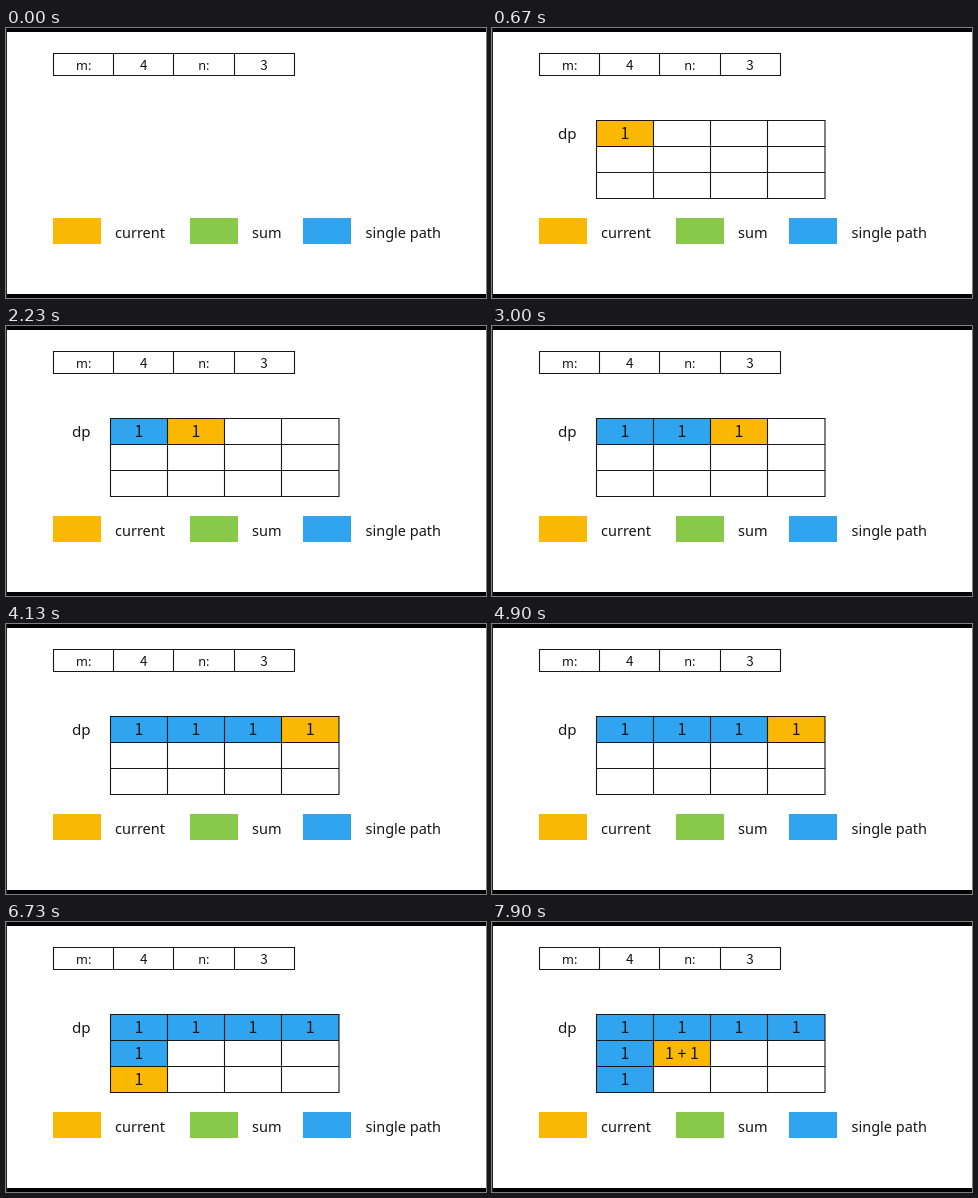
An HTML page for the animation above (8 s loop, 480x270 px).

```html
<!DOCTYPE html>
<html lang="en">
<head>
<meta charset="utf-8">
<title>Unique paths</title>
<style>
html, body { margin: 0; width: 100%; height: 100%; overflow: hidden; background: #fff; }
svg { display: block; width: 100vw; height: 100vh; }
text { font-family: "Noto Sans", "Open Sans", sans-serif; fill: #161616; }
.digit { font-family: "Noto Sans CJK SC", "Noto Sans CJK JP", "Noto Sans", sans-serif; }
.line { fill: none; stroke: #181818; stroke-width: 1.1; }
</style>
</head>
<body>
<svg id="stage" viewBox="0 0 480 270"></svg>
<script>
const NS = "http://www.w3.org/2000/svg";
const stage = document.getElementById("stage");
const LOOP = 8000, START = 600, STEP = 1100;
const ORANGE = "#fbb803", GREEN = "#88c94a", BLUE = "#30a4ee";

function add(parent, tag, attrs, content) {
  const el = document.createElementNS(NS, tag);
  for (const key in attrs) el.setAttribute(key, attrs[key]);
  if (content) el.textContent = content;
  parent.appendChild(el);
  return el;
}

function rect(parent, x, y, width, height, fill) {
  return add(parent, "rect", { x, y, width, height, fill });
}

function label(parent, x, y, size, content, anchor = "start", cls = "") {
  return add(parent, "text",
    { x, y, "font-size": size, "text-anchor": anchor, class: cls }, content);
}

function grid(parent, xs, ys) {
  const left = xs[0], right = xs[xs.length - 1];
  const top = ys[0], bottom = ys[ys.length - 1];
  const d = xs.map(x => `M${x} ${top}V${bottom}`).join("") +
    ys.map(y => `M${left} ${y}H${right}`).join("");
  add(parent, "path", { d, class: "line", "stroke-linecap": "square" });
}

rect(stage, 0, 0, 480, 270, "#fff");
rect(stage, 0, 0, 480, 4, "#000");
rect(stage, 0, 266, 480, 4, "#000");
rect(stage, 0, 0, 1, 270, "#222");

// Input sizes
grid(stage, [47.5, 107.5, 167.5, 228.5, 288.5], [25.5, 47.5]);
["m:", "4", "n:", "3"].forEach((s, i) =>
  label(stage, 77.7 + i * 60.1, 41.8, i % 2 ? 13.5 : 12.7, s, "middle", i % 2 ? "digit" : ""));

// Legend
[[47, 109, ORANGE, "current"], [184, 246, GREEN, "sum"], [297, 359.5, BLUE, "single path"]]
  .forEach(([x, tx, fill, s]) => {
    rect(stage, x, 190, 48, 26, fill);
    label(stage, tx, 209.8, 14.5, s);
  });

// Path table
const table = add(stage, "g", {});
const xs = [104.5, 161.5, 218.5, 275.5, 333], ys = [92.5, 118.5, 144.5, 170.5];
const visits = [[0, 0], [1, 0], [2, 0], [3, 0], [0, 1], [0, 2], [1, 1]];
const cells = visits.map(([col, row]) => {
  const g = add(table, "g", {});
  const x = xs[col], y = ys[row], w = xs[col + 1] - x;
  const box = rect(g, x, y, w, ys[row + 1] - y, ORANGE);
  label(g, x + w / 2, y + 18.9, 16, col && row ? "1 + 1" : "1", "middle", "digit");
  return { g, box };
});
grid(table, xs, ys);
label(table, 66, 111, 15.2, "dp");

function draw(time) {
  const current = Math.floor((time - START) / STEP);
  table.setAttribute("visibility", current < 0 ? "hidden" : "visible");
  cells.forEach(({ g, box }, i) => {
    g.setAttribute("display", i <= current ? "inline" : "none");
    box.setAttribute("fill", i === current ? ORANGE : BLUE);
  });
}

const origin = performance.now();
function tick() {
  draw((performance.now() - origin) % LOOP);
  requestAnimationFrame(tick);
}
draw(0);
requestAnimationFrame(tick);
</script>
</body>
</html>
```
